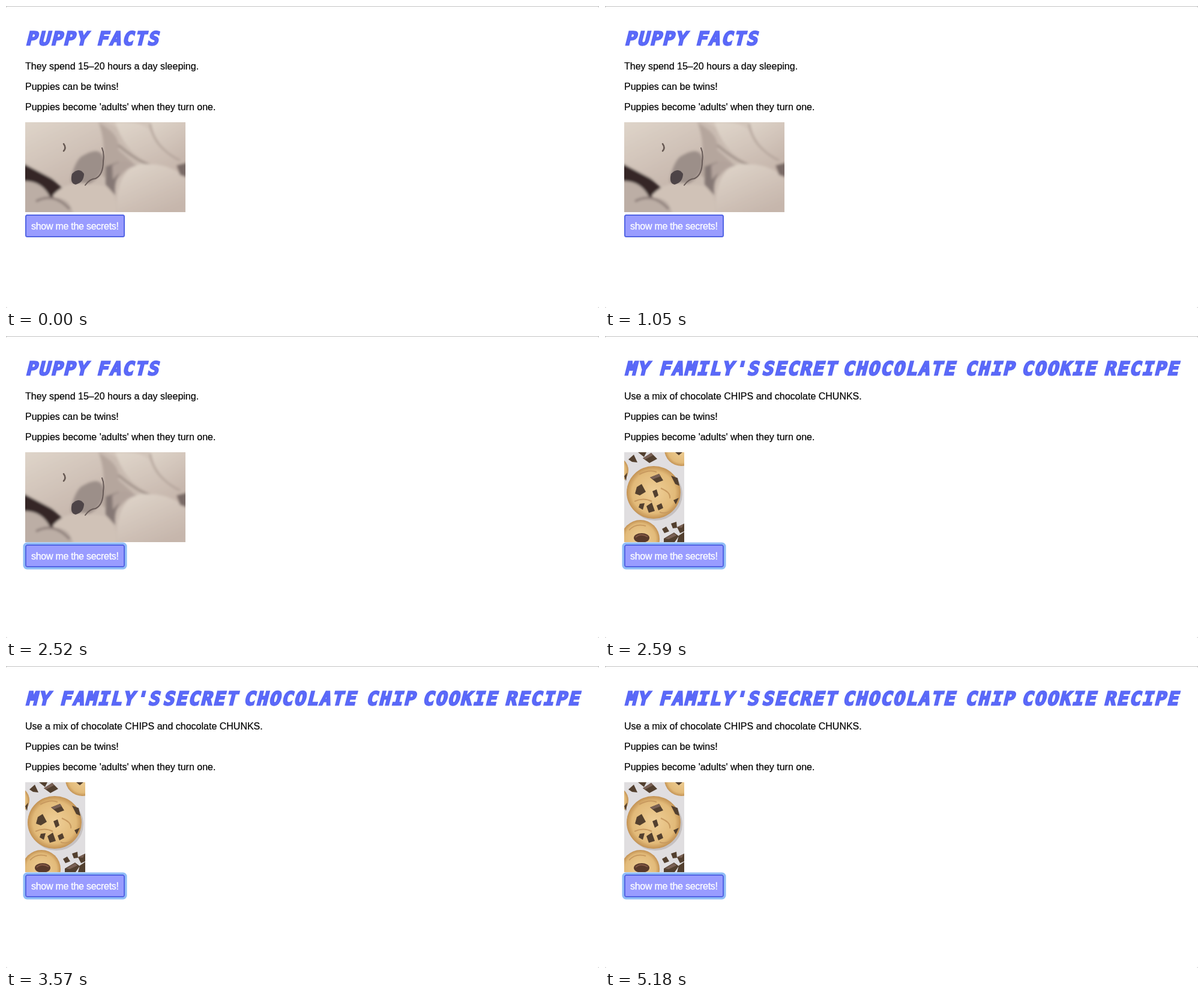
An HTML page for the animation above (5250 ms loop, 988x504 px).

```html
<!DOCTYPE html>
<html lang="en">
<head>
<meta charset="utf-8">
<title>Facts and secrets</title>
<style>
  html, body { margin: 0; width: 100%; height: 100%; overflow: hidden; background: #fff; }
  svg { display: block; width: 988px; height: 504px; }
  text { font: 16px "Liberation Sans", Arial, sans-serif; stroke: #000; stroke-width: .2px; }
  .title {
    font: 700 31px "DejaVu Sans Mono", monospace;
    letter-spacing: 2.3px;
    fill: #5b6aff; stroke: #5a68f4; stroke-width: 2.4px;
  }
  .label { fill: #fff; stroke: #fff; stroke-width: .3px; letter-spacing: -.27px; }
</style>
</head>
<body>
<svg viewBox="0 0 988 504">
  <defs>
    <clipPath id="wide"><rect width="267" height="150"/></clipPath>
    <clipPath id="tall"><rect width="100" height="150"/></clipPath>
    <filter id="soft" x="-10%" y="-10%" width="120%" height="120%"><feGaussianBlur stdDeviation="2"/></filter>
    <filter id="fine"><feGaussianBlur stdDeviation=".6"/></filter>
    <linearGradient id="fur" x2=".6" y2="1">
      <stop stop-color="#e0d6cb"/><stop offset="1" stop-color="#c6b6ac"/>
    </linearGradient>
    <radialGradient id="dough">
      <stop stop-color="#efcf98"/><stop offset=".8" stop-color="#e2ba79"/><stop offset="1" stop-color="#c39253"/>
    </radialGradient>
  </defs>

  <!-- window edge -->
  <rect width="988" height="504" fill="#c4c4c4"/>
  <rect y="1" width="988" height="503" rx="3" fill="#fff"/>

  <text x="32" y="140">Puppies can be twins!</text>
  <text x="32" y="174">Puppies become 'adults' when they turn one.</text>

  <g id="facts">
    <text class="title" transform="translate(0 64.5) skewX(-14)"><tspan x="32.5">PUPPY</tspan> <tspan x="151">FACTS</tspan></text>
    <text x="32" y="106">They spend 15–20 hours a day sleeping.</text>
    <g transform="translate(32 194)" clip-path="url(#wide)">
      <rect width="267" height="150" fill="#c9bbb1"/>
      <g filter="url(#soft)">
        <path d="M120-5H275V70Q235 62 205 30Z" fill="#d2c5ba"/>
        <path d="M206-5Q214 45 275 72V-5Z" fill="url(#fur)"/>
        <path d="M120 0Q160 20 155 46L180 68 150 98 128 90Z" fill="#b5a69d"/>
        <path d="M150 0Q205-4 214 25Q222 52 264 66L267 92Q235 90 214 74Q166 52 150 0Z" fill="url(#fur)"/>
        <path d="M155 38Q178 58 200 68T262 88" fill="none" stroke="#a3948c" stroke-width="4"/>
        <path d="M208 2Q214 42 258 64" fill="none" stroke="#b1a198" stroke-width="3"/>
        <path d="M-5 62Q20 70 60 108L72 128 25 125-5 100Z" fill="#352528"/>
        <path d="M-5-5H120Q132 22 131 60Q130 92 105 106Q78 116 52 98Q18 80-5 68Z" fill="url(#fur)"/>
        <path d="M92 58Q126 36 131 62Q132 91 102 105Q88 109 76 99Q79 72 92 58Z" fill="#9c8f89"/>
        <path d="M46 122Q72 94 112 104Q145 102 151 132V155H60Z" fill="#d0c2b7"/>
        <path d="M-5 98Q28 96 42 126Q76 122 80 155H-5Z" fill="#bcaea5"/>
        <path d="M18 132Q48 116 74 145" fill="none" stroke="#8d7e79" stroke-width="4"/>
        <path d="M134 74L155 66 168 76Q146 90 150 122L134 104Z" fill="#857874"/>
        <path d="M152 155Q150 80 190 70Q244 67 267 94V155Z" fill="url(#fur)"/>
        <path d="M145 72Q162 60 186 72Q158 80 146 96Z" fill="#b2a39b"/>
        <path d="M252 72L270 67V92L258 88Z" fill="#796a66"/>
      </g>
      <g filter="url(#fine)" fill="none" stroke-linecap="round">
        <path d="M64 36Q69 43 64 48" stroke="#665852" stroke-width="2.5"/>
        <path d="M78 86Q90 74 98 86Q98 100 84 104Q74 102 78 86Z" fill="#4d4447"/>
        <path d="M100 105Q108 94 117 94Q130 88 130 65Q132 52 128 43" stroke="#675a57" stroke-width="2"/>
      </g>
    </g>
  </g>

  <g id="secrets">
    <text class="title" transform="translate(0 64.5) skewX(-14)"><tspan x="32.5">MY</tspan> <tspan x="89.5">FAMILY'S</tspan> <tspan x="261">SECRET</tspan> <tspan x="395.5">CHOCOLATE</tspan> <tspan x="599.5">CHIP</tspan> <tspan x="693.5">COOKIE</tspan> <tspan x="831">RECIPE</tspan></text>
    <text x="32" y="106">Use a mix of chocolate CHIPS and chocolate CHUNKS.</text>
    <g transform="translate(32 194)" clip-path="url(#tall)">
      <rect width="100" height="150" fill="#e0dee0"/>
      <g filter="url(#fine)">
        <ellipse cx="52" cy="70" rx="45" ry="44" fill="#c6c1c1"/>
        <g fill="url(#dough)">
          <circle cx="95" cy="-5" r="28"/>
          <circle cx="-16" cy="30" r="23"/>
          <ellipse cx="49" cy="67" rx="45" ry="44"/>
          <circle cx="27" cy="145" r="32"/>
        </g>
        <path d="M25 37Q42 28 54 33M17 82Q32 75 46 82M61 60Q78 67 76 77M59 100Q73 105 84 91M8 130Q19 118 36 123" fill="none" stroke="#c89a60" stroke-width="2"/>
        <path d="M43 42L58 36 65 47 54 51ZM21 58L29 53 36 66 26 72 18 69ZM47 65L54 62 57 72 51 76ZM26 86L34 85 31 96 24 92ZM37 90L46 84 51 98 41 101ZM54 89L62 85 65 93 57 97ZM78 39L89 43 92 56 85 53ZM82 80L91 76 86 87ZM7 12L16 4 22 17 13 16ZM23 0H37L33 8ZM31 10L45 1 55 11 42 18ZM0 40L5 34 3 48ZM85 0H97L91 5ZM63 128L70 124 75 132 67 135ZM78 119L87 116 88 126 81 127ZM88 125L100 119V132L93 135ZM66 144L83 134 91 140 84 150H66ZM91 139L100 133V150H88Z" fill="#53402f"/>
        <path d="M43 42L58 36 61 40 48 45ZM31 10L45 1 48 5 35 12ZM68 144L83 135 87 139 74 145ZM88 125L99 120 96 126Z" fill="#7a6155"/>
        <ellipse cx="29" cy="143" rx="13" ry="8" fill="#5a3a2b"/>
        <path d="M19 142Q27 134 39 141" fill="none" stroke="#855947" stroke-width="2"/>
      </g>
    </g>
  </g>

  <rect id="ring" fill="none" stroke="#8fbcf6" filter="url(#fine)"/>
  <rect x="33" y="349" width="164" height="36" rx="2.5" fill="#999cff" stroke="#5264e4" stroke-width="2"/>
  <text class="label" x="42" y="373">show me the secrets!</text>
</svg>
<script>
const LOOP = 5250, STEP = 70, FOCUS = 2100, SETTLED = 2240, SWAP = 2590;
const byId = id => document.getElementById(id);
const show = (id, on) => byId(id).style.display = on ? "" : "none";

function drawRing(t) {
  const p = Math.min(1, Math.max(0, (t - FOCUS + STEP) / (SETTLED - FOCUS + STEP)));
  const out = 3.5 - 1.75 * p;
  const box = {
    x: 32 - out, y: 348 - out, width: 166 + 2 * out, height: 38 + 2 * out,
    rx: 3 + out, "stroke-width": 3.5, opacity: t < FOCUS ? 0 : p
  };
  for (const key in box) byId("ring").setAttribute(key, box[key]);
}

function draw() {
  const t = Math.floor(performance.now() % LOOP / STEP) * STEP;
  show("facts", t < SWAP);
  show("secrets", t >= SWAP);
  drawRing(t);
  requestAnimationFrame(draw);
}
draw();
</script>
</body>
</html>
```
